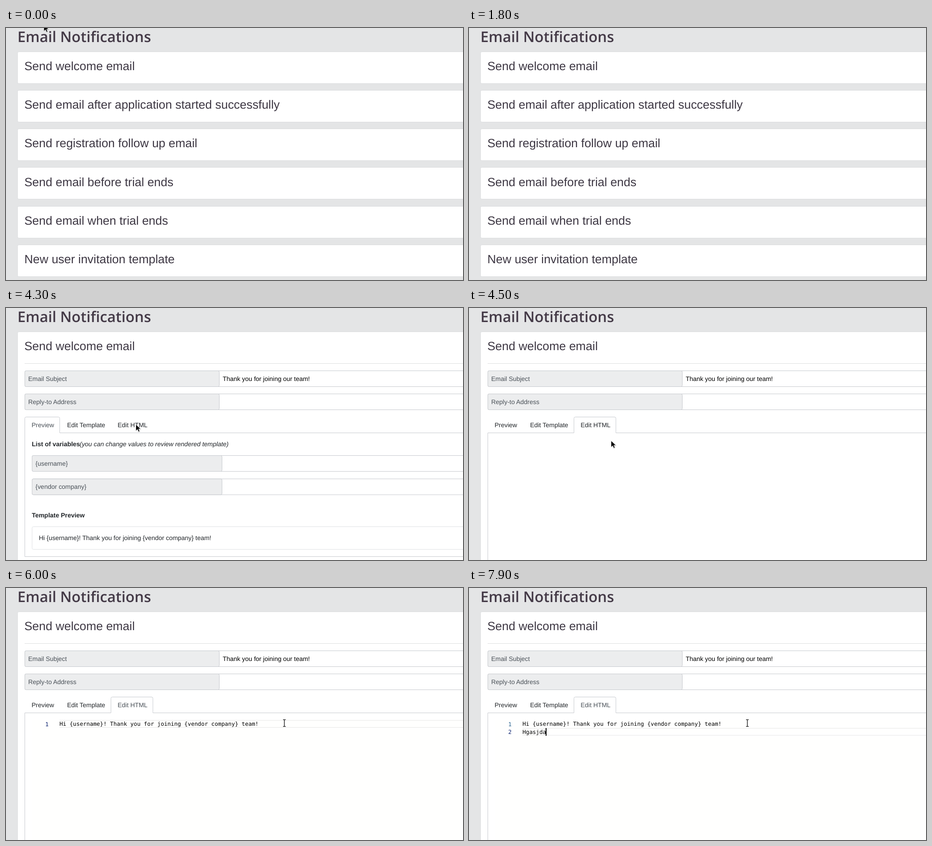
These frames come from a looping animation (1008 by 556 pixels, 8 s). An HTML page:

```html
<!DOCTYPE html>
<html lang="en">
<head>
<meta charset="utf-8">
<title>Email Notifications</title>
<style>
  html, body { margin: 0; width: 100%; height: 100%; overflow: hidden; background: #e4e5e6; }
  svg { display: block; width: 100vw; height: 100vh; }
  text { font-family: "Liberation Sans", Arial, sans-serif; font-size: 13.95px; fill: #212529; white-space: pre; text-rendering: geometricPrecision; }
  .title { font: 600 32.4px "Open Sans", sans-serif; fill: #443a47; }
  .head { font-size: 26.4px; fill: #3d3743; }
  .label { fill: #495057; }
  .input { fill: #000; }
  .bold { font-weight: bold; }
  .italic { font-style: italic; }
  .code { font: 12.36px "DejaVu Sans Mono", monospace; fill: #000; }
</style>
</head>
<body>
<svg id="stage" viewBox="0 0 1008 556" preserveAspectRatio="none"></svg>
<script>
const LOOP = 8000;
const CHAR = 7.44;
const stage = document.getElementById('stage');

function add(parent, tag, attrs = {}, content = '') {
  const el = document.createElementNS('http://www.w3.org/2000/svg', tag);
  for (const key in attrs) el.setAttribute(key, attrs[key]);
  el.textContent = content;
  parent.appendChild(el);
  return el;
}
const group = parent => add(parent, 'g');
const text = (parent, x, y, content, cls = '') => add(parent, 'text', { x, y, class: cls }, content);
const box = (parent, x, y, width, height, fill, stroke = 'none', rx = 0) =>
  add(parent, 'rect', { x, y, width, height, fill, stroke, rx });
const path = (parent, d, stroke, fill = 'none') => add(parent, 'path', { d, stroke, fill });
const show = (el, on) => el.setAttribute('display', on ? 'inline' : 'none');

function field(parent, x, y, split, label) {
  const g = group(parent);
  const frame = box(g, x + .5, y + .5, 1100, 35, '#fff', '#c6c9ce', 3);
  const cell = box(g, x + .5, y + .5, split - x, 35, '#ecedee', '#c6c9ce', 3);
  text(g, x + 8, y + 22.5, label, 'label');
  return [frame, cell];
}

// List of templates
box(stage, 0, 0, 1008, 556, '#e4e5e6');
text(stage, 25.2, 31, 'Email Notifications', 'title');
const list = group(stage);
[
  'Send welcome email',
  'Send email after application started successfully',
  'Send registration follow up email',
  'Send email before trial ends',
  'Send email when trial ends',
  'New user invitation template'
].forEach((name, i) => {
  const y = Math.round(52.8 + i * 85.2);
  box(list, 25.5, y - .5, 1100, 70, '#fff', '#dbdcde', 3);
  text(list, 40.5, 93 + i * 85.2, name, 'head');
});

// Opened template
const form = group(stage);
box(form, 25.5, 52.5, 1100, 600, '#fff', '#dbdcde', 3);
text(form, 40.5, 93, 'Send welcome email', 'head');
path(form, 'M41 122.5H1008', '#dcdddf');
field(form, 41, 138, 470, 'Email Subject');
text(form, 478, 160.5, 'Thank you for joining our team!', 'input');
const reply = field(form, 41, 189, 470, 'Reply-to Address');

const preview = group(form);
path(preview, 'M41.5 548.5V243.5q0 -3 3 -3H115.5q3 0 3 3V275.5H1008M41.5 548.5H1008', '#c6c9ce');
text(preview, 57, 305, 'List of variables', 'bold');
text(preview, 162.5, 305, '(you can change values to review rendered template)', 'italic');
field(preview, 57, 325, 476, '{username}');
field(preview, 57, 376.5, 476, '{vendor company}');
text(preview, 57, 461.5, 'Template Preview', 'bold');
box(preview, 57.5, 482.5, 1000, 50, '#fff', '#dfe1e4', 3);
text(preview, 72.5, 512, 'Hi {username}! Thank you for joining {vendor company} team!');

const html = group(form);
path(html, 'M41.5 556V275.5H231.5V243.5q0 -3 3 -3H321q3 0 3 3V275.5H1008', '#c6c9ce');
const tabs = [[56.5, 'Preview'], [134.7, 'Edit Template'], [246.3, 'Edit HTML']]
  .map(([x, name]) => text(form, x, 262.5, name));

const editor = group(html);
box(editor, 57, 291, 951, 265, '#fffffe');
const current = path(editor, 'M118 292H1010V307.5H118', '#e6e6e6');
const numbers = [304.8, 322.3].map((y, i) => text(editor, 86.5, y, i + 1, 'code'));
text(editor, 118, 304, 'Hi {username}! Thank you for joining {vendor company} team!', 'code');
const typed = text(editor, 118, 321.5, '', 'code');
const caret = box(editor, 0, 0, 2, 17, '#000');

// Pointers
const arrow = group(stage);
path(arrow, 'M.5 0V14.2L3.9 11.2L6.3 17L9.2 15.8L6.8 10.3H11.5Z', '#c9c9c9', '#fff');
path(arrow, 'M1 1V13L4.2 10.2L6.6 15.6L8.3 14.9L6 9.4H10Z', 'none', '#000');
const beam = group(stage);
const beamShape = 'M-3 -7.5H-1Q0 -7.5 0 -6.5Q0 -7.5 1 -7.5H3M0 -7V7M-3 7.5H-1Q0 7.5 0 6.5Q0 7.5 1 7.5H3';
path(beam, beamShape, '#ddd').setAttribute('stroke-width', 2.6);
path(beam, beamShape, '#111').setAttribute('stroke-width', 1.2);

// [time, pointer, x, y], each held until the next
const moves = [
  [0, arrow, 83, -7], [100, arrow, 117, 59],
  [300, beam, 141.5, 97], [500, beam, 142, 97],
  [800, beam, 147, 104], [900, beam, 150, 108], [1000, beam, 152, 110],
  [1200, beam, 146, 103], [1300, beam, 140, 98],
  [1600, arrow, 400, 150], [1700, arrow, 778, 239], [1800, null, 0, 0],
  [3800, arrow, 552, 267], [3900, arrow, 430, 255],
  [4100, arrow, 288, 257], [4300, arrow, 286, 257], [4500, arrow, 313, 293],
  [4700, beam, 370, 360], [4800, beam, 400, 402],
  [5000, beam, 418, 419], [5100, beam, 438, 410], [5300, beam, 442, 409.5],
  [5400, beam, 484, 403], [5600, beam, 615, 350],
  [5800, beam, 613, 307], [6000, beam, 614, 298]
];
const typing = [[0, ''], [7000, 'H'], [7200, 'Hg'], [7700, 'Hgasjd'], [7900, 'Hgasjda']];
const at = (steps, t) => steps.findLast(step => step[0] <= t);

function render(t) {
  const opened = t >= 3800, editing = t >= 4500, second = t >= 6600;
  show(list, !opened);
  show(form, opened);
  show(preview, !editing);
  show(html, editing);
  show(editor, t >= 4700);

  const edge = t < 3900 ? '#a5a8af' : t < 4100 ? '#b6b9bf' : '#c6c9ce';
  reply.forEach(el => el.setAttribute('stroke', edge));
  reply[1].setAttribute('fill', t < 3900 ? '#e7e8e9' : t < 4100 ? '#eaebec' : '#ecedee');
  tabs[0].style.fill = editing ? '#212529' : '#495057';
  tabs[2].style.fill = t >= 4700 ? '#495057' : '#212529';

  const word = at(typing, t)[1];
  typed.textContent = word;
  current.setAttribute('transform', `translate(0 ${second ? 17.5 : 0})`);
  numbers[0].style.fill = second ? '#2b6590' : '#0b216f';
  numbers[1].style.fill = '#0b216f';
  show(numbers[1], second);
  show(caret, second || (t >= 5400 && t < 6000));
  caret.setAttribute('x', second ? Math.floor(118 + word.length * CHAR - .5 * !!word) : 556);
  caret.setAttribute('y', second ? 309 : 291);

  const [, pointer, x, y] = at(moves, t);
  for (const el of [arrow, beam]) show(el, el === pointer);
  if (pointer) pointer.setAttribute('transform', `translate(${x} ${y})`);
}

const start = performance.now();
function tick() {
  render((performance.now() - start) % LOOP);
  requestAnimationFrame(tick);
}
render(0);
requestAnimationFrame(tick);
</script>
</body>
</html>
```
